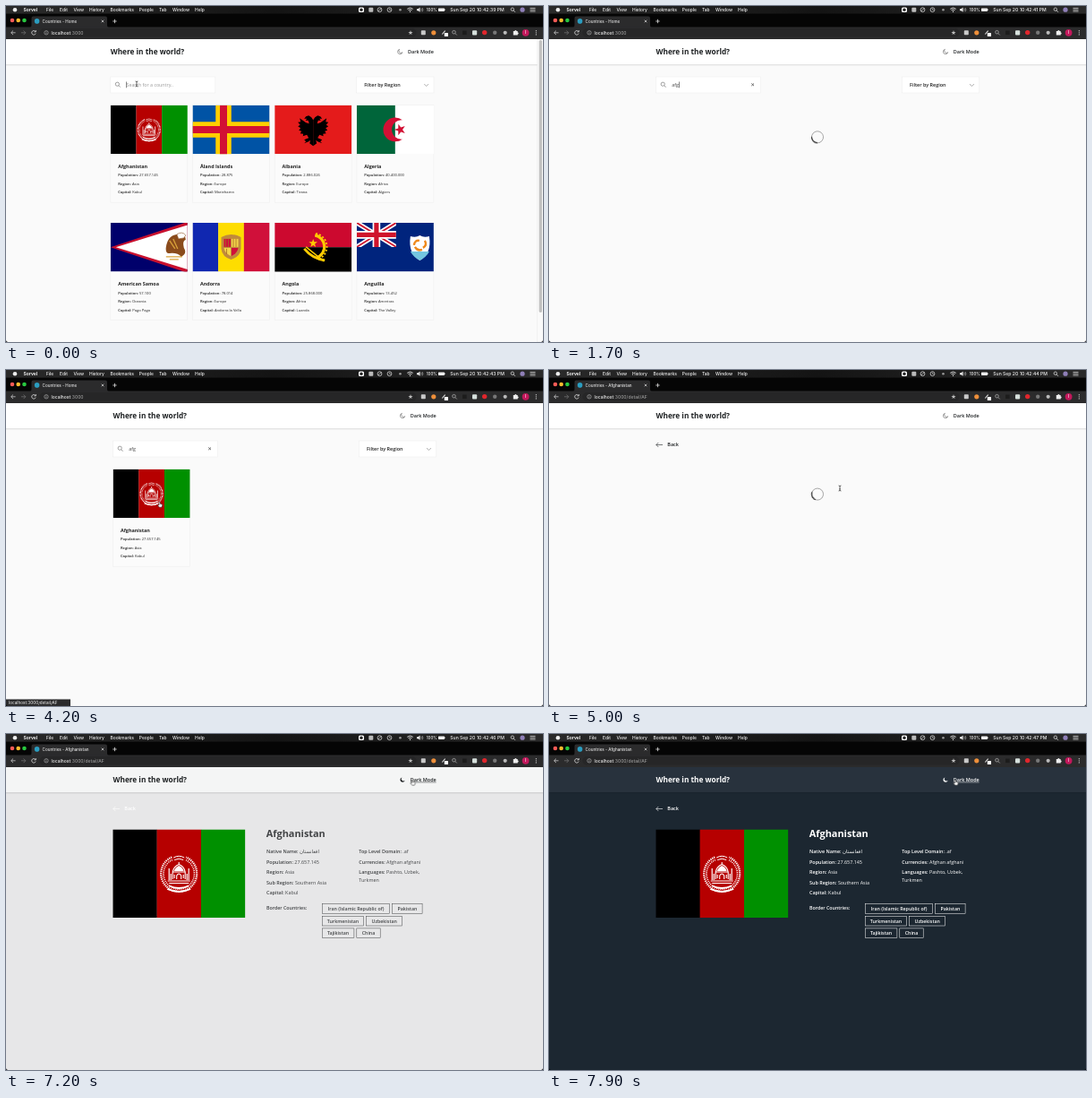
Recreate the animation shown at these times as an HTML page. Size 600x375 px, loop 8000 ms.

```html
<!DOCTYPE html>
<html lang="en">
<head>
<meta charset="utf-8">
<title>Countries</title>
<style>
html, body { margin: 0; width: 100%; height: 100%; overflow: hidden; background: #000; }
svg { display: block; }
text { font-family: "Open Sans", "Noto Sans", "DejaVu Sans", sans-serif; white-space: pre; }
.ui text { font-family: Inter, "Liberation Sans", sans-serif; font-weight: 500; }
.b { font-weight: 600; }
.h { font-weight: 700; }
.page { animation: page 8s infinite; }
.head { animation: head 8s infinite; }
.ink { animation: ink 8s infinite; fill: currentColor; }
.late { animation: late 8s infinite; fill: currentColor; }
.flip { animation: flip 8s infinite step-end; fill: currentColor; }
.spin { animation: spin 1s linear infinite; }
#cursor { animation: move 8s infinite; }
@keyframes page { 0%, 89.55% { fill: #fafafa; animation-timing-function: ease } 94.4%, 100% { fill: #1c2731 } }
@keyframes head { 0%, 89.7% { fill: #fff; animation-timing-function: ease } 94.4%, 100% { fill: #28323d } }
@keyframes ink { 0%, 89.44% { color: #2a2c2e; animation-timing-function: ease } 94.44%, 100% { color: #fff } }
@keyframes late { 0%, 91.85% { color: #1d2022; animation-timing-function: ease } 95.8%, 100% { color: #fff } }
@keyframes flip { 0% { color: #1d2022 } 89.44%, 100% { color: #fff } }
@keyframes spin { to { transform: rotate(360deg) } }
@keyframes move {
  0%, 47% { transform: translate(146px, 87px) }
  52%, 57% { transform: translate(172px, 150px) }
  62%, 68% { transform: translate(325px, 132px) }
  76% { transform: translate(338px, 165px) }
  87%, 100% { transform: translate(454.5px, 54px) }
}
</style>
</head>
<body>
<svg id="stage" width="100%" height="100%" viewBox="0 0 600 375"></svg>
<script>
const LOOP = 8000, W = 86, H = 54.5, RED = '#b60000', GREEN = '#009000';

const rect = (x, y, w, h, fill, more = '') =>
  `<rect x="${x}" y="${y}" width="${w}" height="${h}" ${fill ? `fill="${fill}"` : ''} ${more}/>`;
const dot = (x, y, r, fill, more = '') => `<circle cx="${x}" cy="${y}" r="${r}" fill="${fill}" ${more}/>`;
const path = (d, fill, more = '') => `<path d="${d}" fill="${fill}" ${more}/>`;
const line = (d, stroke, w = .7, more = '') => path(d, 'none', `stroke="${stroke}" stroke-width="${w}" ${more}`);
const text = (x, y, size, str, more = '') => `<text x="${x}" y="${y}" font-size="${size}" ${more}>${str}</text>`;
const at = (x, y, body, more = '') => `<g transform="translate(${x} ${y}) ${more}">${body}</g>`;
const on = (span, body) => `<g data-on="${span}">${body}</g>`;
const frame = (x, y, w, h, box, body) =>
  `<svg x="${x}" y="${y}" width="${w}" height="${h}" viewBox="${box}" preserveAspectRatio="none">${body}</svg>`;
const star = (r, fill, turn = -90) => {
  const pts = [...Array(10)].map((_, i) => {
    const a = (turn + i * 36) * Math.PI / 180, q = i % 2 ? r * .4 : r;
    return `${(q * Math.cos(a)).toFixed(2)},${(q * Math.sin(a)).toFixed(2)}`;
  });
  return `<polygon points="${pts.join(' ')}" fill="${fill}"/>`;
};
const bands = (...colors) => colors.map((c, i) => rect(i * W / 3, 0, W / 3 + .1, H, c)).join('');

// Flags, drawn on an 86 x 54.5 field
const seal =
  line('M-8,-18.5A20,20 0 1 0 8,-18.5', '#fff', 2.2, 'stroke-dasharray="1.3 .9"') +
  line('M-7.5,-15.5A17.2,17.2 0 1 0 7.5,-15.5', '#fff', 1.6, 'stroke-dasharray="1 1.1"') +
  line('M-6,-18Q0,-21.5 6,-18M-5,-15.5Q0,-18 5,-15.5', '#fff', 1) +
  line('M-7,6V-2Q-6,-8 0,-10.5Q6,-8 7,-2V6M0,-10.5V-13M-7,-2H7M-2.5,6V2Q0,-2 2.5,2V6M-5,1V5M5,1V5', '#fff', 1.1) +
  path('M-5.5,-3Q-4,-7.5 0,-9Q4,-7.5 5.5,-3Z', '#fff') +
  line('M-11,7V-6M11,7V-6M-9,7V0M9,7V0', '#fff', 1.2) + line('M-12.5,8H12.5M-11,10.5H11', '#fff', 1.2) +
  line('M-11,13.5Q0,18.5 11,13.5M-13,17Q0,23 13,17', '#fff', 1.8);
const wing = path('M0,-11L-2,-14 -5,-16 -8,-15 -10,-12.5 -7,-12.5 -8.5,-10.5 -5.5,-10.5 -4.5,-7 -8,-8 -15,-13 -14,-9 -17,-8.5 -14.5,-5.5 -17,-4 -14,-2 -16,.5 -13,1.5 -14.5,4 -11,4.5 -11.5,7 -7,5.5 -5,9 -10,11 -8,13 -10,15 -5,13 -3,11.5 -4,15 0,18Z', '#000');
const union = rect(0, 0, 44, 27, '#00247d') +
  line('M0,0L44,27M44,0L0,27', '#fff', 5.2) + line('M0,0L44,27M44,0L0,27', '#cf142b', 1.8) +
  line('M22,0V27M0,13.5H44', '#fff', 8.6) + line('M22,0V27M0,13.5H44', '#cf142b', 5.2);
const flags = [
  bands('#000', RED, GREEN) + at(43, 27.5, seal, 'scale(.62)'),
  rect(0, 0, W, H, '#0053a5') + line('M34.5,0V55M0,27.3H86', '#ffce00', 17.5) + line('M34.5,0V55M0,27.3H86', '#d21034', 8),
  rect(0, 0, W, H, '#e41b1b') + at(43, 27.5, wing + `<g transform="scale(-1 1)">${wing}</g>`),
  rect(0, 0, 43, H, '#00653a') + rect(43, 0, 43, H, '#fff') +
    path('M51,16.5A13.4,13.4 0 1 0 51,38A10.8,10.8 0 1 1 51,16.5Z', '#d21034') + at(48.5, 27.3, star(6.6, '#d21034', 180)),
  rect(0, 0, W, H, '#00006b') + path('M0,27.3L86,-1V56Z', '#c8102e') + path('M6,27.3L86,2.5V52Z', '#fff') +
    path('M62,27Q64,14 74,13Q84,12 84,19Q80,20 82,28Q86,34 79,38Q75,33 66,34Q61,35 62,27Z', '#8a4b1c') +
    path('M74,13Q80,9 84,14L82,17L76,18Z', '#fff', 'stroke="#8a4b1c" stroke-width=".6"') +
    line('M62,38H80M66,41H76M66,20L72,29M70,18L75,29', '#d9a23a', 1.3),
  bands('#1027b0', '#fedd00', '#d0103a') +
    path('M32,16Q43,10 54,16V29Q53,38 43,41Q33,38 32,29Z', '#c08a3c') + rect(35, 18, 7.5, 9, '#d0103a') +
    rect(43.5, 18, 7.5, 9, '#f3d34a') + path('M35,28H42.5V37Q36,34 35,28Z', '#f3d34a') +
    path('M43.5,28H51Q50,34 43.5,37Z', '#d0103a') + line('M37,18V27M40,18V27M45.5,18V27M48.5,18V27M38,29V35', '#a56b24', .8),
  rect(0, 0, W, 27.3, '#cc092f') + rect(0, 27.3, W, 28, '#000') +
    line('M45,14A13,13 0 0 1 47,39', '#ffcb00', 3.2) + line('M46,12A15,15 0 0 1 48,41', '#ffcb00', 1.8, 'stroke-dasharray="2 2"') +
    line('M33,29Q42,40 56,42', '#ffcb00', 2.8) + line('M55,43L35,27', '#ffcb00', 1.4) + at(43, 23, star(5, '#ffcb00')),
  rect(0, 0, W, H, '#00247d') + frame(0, 0, 44, 27, '0 0 44 27', union) +
    path('M60,15Q66,17 70.5,14Q75,17 81,15Q84,34 70.5,42Q57,34 60,15Z', '#fff') +
    path('M60,32H81Q78,38 70.5,42Q63,38 60,32Z', '#73c5e0') +
    line('M64,25Q65,19 70,20M76,20Q79,25 74,28M65,27Q68,32 73,30', '#ef8a1d', 2.4)
];
const countries = [
  ['Afghanistan', '27.657.145', 'Asia', 'Kabul'], ['Åland Islands', '28.875', 'Europe', 'Mariehamn'],
  ['Albania', '2.886.026', 'Europe', 'Tirana'], ['Algeria', '40.400.000', 'Africa', 'Algiers'],
  ['American Samoa', '57.100', 'Oceania', 'Pago Pago'], ['Andorra', '78.014', 'Europe', 'Andorra la Vella'],
  ['Angola', '25.868.000', 'Africa', 'Luanda'], ['Anguilla', '13.452', 'Americas', 'The Valley']
];
const fact = (x, y, size, label, value) => text(x, y, size, `<tspan class="b">${label}:</tspan> ${value}`);
const box = (x, y, w, h) => rect(x, y, w, h, '#fff', 'stroke="#eee" stroke-width=".6"');
const card = i => {
  const [name, pop, region, capital] = countries[i];
  return at(116.8 + i % 4 * 91.7, 110.7 + (i > 3 ? 131.2 : 0),
    rect(0, 0, W, 108.5, '#fbfbfb', 'stroke="#efefef" stroke-width=".6"') +
    frame(0, 0, W, H, `0 0 ${W} ${H}`, flags[i]) +
    text(8.4, 70, 5.45, name, 'class="h"') + fact(8.4, 79.8, 4.1, 'Population', pop) +
    fact(8.4, 89.2, 4.1, 'Region', region) + fact(8.4, 98.7, 4.1, 'Capital', capital));
};
const spinner = (y, turn) => at(300, y,
  dot(0, 0, 6.5, 'none', 'stroke="#8c8c8c" stroke-width=".7"') +
  `<g class="spin">${dot(0, 0, 6.5, 'none', 'stroke="#222" stroke-width="1.1" stroke-dasharray="10.2 40"')}</g>`, `rotate(${turn})`);
const lens = (x, y, r, c) => dot(x, y, r, 'none', `stroke="${c}" stroke-width=".7"`) + line(`M${x + r * .7},${y + r * .7}l2,2`, c);
const cross = (x, y, r, c) => line(`M${x - r},${y - r}l${2 * r},${2 * r}m0,${-2 * r}l${-2 * r},${2 * r}`, c);

const menu = [['File', 45], ['Edit', 60], ['View', 75.5], ['History', 93], ['Bookmarks', 116.5],
  ['People', 148.8], ['Tab', 171], ['Window', 186], ['Help', 211]];
const glass = '<linearGradient id="glass"><stop stop-color="#2a2a2a"/><stop offset=".5" stop-color="#141414"/><stop offset="1" stop-color="#2a2a2a"/></linearGradient>';
const menuBar = glass + rect(0, 0, 600, 8.6, 'url(#glass)') + dot(10, 4.2, 2.3, '#eee') +
  `<g fill="#f2f2f2">${text(19.5, 6, 5, 'Sorvel', 'style="font-weight:700"')}${menu.map(([s, x]) => text(x, 6, 4.9, s)).join('')}` +
  text(469.8, 5.8, 4.4, '100%') + text(496.3, 6, 5.1, 'Sun Sep 20') + text(526, 6, 5.1, '', 'id="clock"') + '</g>' +
  rect(394, 1.4, 6, 5.6, '#fff', 'rx="1.5"') + dot(397, 4.2, 1.7, '#222') + rect(405.3, 1.7, 5, 5, '#bbb', 'rx="1"') +
  dot(417.5, 4.2, 2.4, 'none', 'stroke="#eee" stroke-width=".7"') + line('M415.8,5.9l3.4,-3.4', '#eee') +
  dot(428.5, 4.2, 2.4, 'none', 'stroke="#eee" stroke-width=".7"') + line('M428.5,2.7V4.4H430', '#eee', .5) + dot(440.5, 4.2, 1.3, '#999') +
  line('M448.3,3.3Q451.5,.7 454.7,3.3M449.6,4.8Q451.5,3.2 453.4,4.8', '#eee', .9) + dot(451.5, 6.2, .7, '#eee') +
  path('M459,3.2H460.5L462.5,1.6V6.8L460.5,5.2H459Z', '#eee') + line('M463.6,2.8Q464.8,4.2 463.6,5.6M465,2Q466.8,4.2 465,6.4', '#eee', .5) +
  rect(483, 2.4, 7, 3.6, '#eee', 'rx=".7"') + rect(490.4, 3.5, .6, 1.4, '#eee') + lens(565.8, 3.7, 1.7, '#eee') +
  dot(577, 4.2, 2.6, '#8f7fb8') + line('M585.5,2.4h6M585.5,4.2h6M585.5,6h6', '#eee', .7);
const tools = rect(0, 8.5, 600, 16, '#050505') + path('M26.5,24Q28.5,24 28.5,21V13.5Q28.5,11.5 30.5,11.5H111Q113,11.5 113,13.5V21Q113,24 115,24Z', '#2b2b2c') +
  rect(0, 23.5, 600, 13.5, '#2b2b2c') + rect(37.5, 25, 421, 9.6, '#262627', 'rx="4.8"') +
  dot(7, 16, 2.3, '#fc5b57') + dot(13.7, 16, 2.3, '#fdbc2e') + dot(20.5, 16, 2.3, '#28c840') + dot(34.6, 16.9, 2.8, '#2b9dc0') +
  '<g fill="#e4e4e4">' + on('0-4450', text(40.6, 18.7, 4.55, 'Countries - Home')) + on('4450-8000', text(40.6, 18.7, 4.55, 'Countries - Afghanistan')) + '</g>' +
  cross(108, 17, 1.3, '#ddd') + line('M119.3,17h4.4M121.5,14.8v4.4', '#ddd', .8) +
  line('M10.6,29.8H5.8M8,27.5L5.7,29.8L8,32.1', '#ddd') + line('M17,29.8H21.8M19.6,27.5L21.9,29.8L19.6,32.1', '#777') +
  line('M33,28.6A2.3,2.3 0 1 0 33.2,30.6M33.3,27V28.9H31.4', '#ddd', .8) +
  dot(45, 29.8, 2.2, 'none', 'stroke="#bbb" stroke-width=".6"') + line('M45,29.3V31M45,28.3V28.8', '#bbb', .6) +
  text(50.5, 31.7, 5, 'localhost<tspan fill="#999">:3000<tspan id="route"></tspan></tspan>', 'fill="#eee"') +
  at(452, 29.8, star(2.7, '#bbb')) + rect(463.8, 27.3, 5, 5, '#c9c9c9', 'rx=".8"') + dot(477.8, 29.8, 2.6, '#ee8f3a') +
  line('M487.3,31.5l3.4,-3.8', '#ddd', 1.1) + rect(489.8, 30, 4.2, 4, '#fff', 'rx=".6"') + lens(500.5, 29.2, 1.8, '#bbb') +
  rect(510, 27.5, 4.6, 4.6, '#1c1c1c') + rect(521, 27.2, 5.2, 5.2, '#d6e0dc', 'rx="1"') + dot(534.7, 29.6, 2.7, '#e0262c') +
  dot(546.2, 29.8, 2.2, '#777') + dot(557.7, 29.8, 2.1, '#bbb') + path('M566.8,28h1.6a1,1 0 0 1 2,0h1.3v1.6a1,1 0 0 1 0,2v1h-4.9z', '#eee') +
  dot(580.6, 29.8, 3.9, '#c2185b') + text(580.6, 31.4, 4.4, 'I', 'fill="#fff" text-anchor="middle"') +
  [27.7, 29.8, 31.9].map(y => dot(592.3, y, .6, '#ddd')).join('');

const moon = 'M2.6,.7A2.7,2.7 0 1 1-.7,-2.6A2.2,2.2 0 0 0 2.6,.7Z';
const header = rect(0, 65, 600, 1.1, '#000', 'opacity=".09"') + rect(0, 66.1, 600, 1, '#000', 'opacity=".03"') +
  rect(0, 36.5, 600, 28.5, '', 'class="head"') +
  `<g class="shift"><g class="late">${text(116.7, 53.8, 8.25, 'Where in the world?', 'class="h"')}${text(449, 53, 5.45, 'Dark Mode', 'class="b"')}` +
  on('6850-8000', rect(449, 53.7, 28.8, .5)) + on('7155-8000', at(440.3, 51, path(moon, 'currentColor'))) + '</g>' +
  on('0-7155', at(440.3, 51, line(moon, '#444', .5))) + '</g>';

const home = on('0-4450', '<g class="shift" fill="#222">' +
  box(116.8, 79, 117, 18) + lens(124.4, 87.2, 2.1, '#777') + text(134.5, 90, 5.3, '', 'id="query"') +
  rect(0, 84.5, .5, 6.8, '#111', 'id="caret"') + on('950-4450', cross(224.8, 87.8, 1.4, '#333')) +
  box(391.6, 79, 86.4, 18) + text(400.2, 90, 5.45, 'Filter by Region', 'class="b"') + line('M467.3,87.1l2.4,2.4l2.4,-2.4', '#777', .6) +
  on('0-1050', countries.map((_, i) => card(i)).join('')) + on('3450-4450', card(0)) + '</g>' +
  on('0-1050', rect(593.8, 37, 6.2, 338, '#fafafa', 'stroke="#e6e6e6" stroke-width=".4"') + rect(595.6, 38, 3.3, 304, '#c1c1c1', 'rx="1.6"')) +
  on('1050-3450', spinner(146.3, -162)));

const borders = [['Iran (Islamic Republic of)', 353.3, 189.7, 75.4], ['Pakistan', 431.7, 189.7, 33.4], ['Turkmenistan', 353.3, 203.3, 46.4],
  ['Uzbekistan', 402.7, 203.3, 40], ['Tajikistan', 353.3, 216.9, 35.6], ['China', 391.8, 216.9, 26.4]];
const facts = [[291, 133.3, 'Native Name', 'افغانستان'], [291, 144.8, 'Population', '27.657.145'], [291, 156.2, 'Region', 'Asia'],
  [291, 167.6, 'Sub Region', 'Southern Asia'], [291, 179, 'Capital', 'Kabul'], [394.3, 133.3, 'Top Level Domain', '.af'],
  [394.3, 144.8, 'Currencies', 'Afghan afghani'], [394.3, 156.2, 'Languages', 'Pashto, Uzbek,']];
const detail = on('4450-8000', `<g class="flip">${text(132.3, 85.4, 5.45, 'Back', 'class="b"')}${line('M127,83.5H119.8M122.3,81L119.8,83.5L122.3,86', 'currentColor', .6)}</g>`) +
  on('4450-5250', spinner(138.6, 110)) +
  on('5250-8000', frame(119.3, 106.4, 148, 98.6, `0 0 ${W} ${H}`, bands('#000', RED, GREEN)) +
    at(193.2, 156, seal) + '<g class="ink">' + text(290.8, 115, 10.9, 'Afghanistan', 'class="h"') +
    facts.map(([x, y, label, value]) => fact(x, y, 5.42, label, value)).join('') + text(394.3, 164.6, 5.42, 'Turkmen') +
    text(291, 195.7, 5.3, 'Border Countries:', 'class="b"') +
    borders.map(([s, x, y, w]) => rect(x, y, w, 10.7, 'none', 'stroke="currentColor" stroke-width=".5"') +
      text(x + w / 2, y + 7.3, 5.3, s, 'class="b" text-anchor="middle"')).join('') + '</g>');

const status = on('4050-4650', '<g class="ui">' + rect(0, 367.5, 72, 7.5, '#2b2b2c') + text(3, 373, 4.6, 'localhost:3000/detail/AF', 'fill="#ddd"') + '</g>');
const beam = 'M-1.4,-3Q0,-3 0,-2V2Q0,3 -1.4,3M1.4,-3Q0,-3 0,-2M0,2Q0,3 1.4,3M-.7,.9H.7';
const hand = path('M-1,-2.6Q-.2,-3.3 .2,-2.4L.5,-.4Q2.6,-.5 2.7,.6Q2.7,2 1.9,3.2H-.7L-2.5,.9Q-2.2,0 -.9,.7Z', '#fff', 'stroke="#111" stroke-width=".5"');
const cursor = '<g id="cursor">' + on('0-950,3750-4000,4650-6850', line(beam, '#fff', 1.4) + line(beam, '#222', .7)) + on('4000-4650,6850-8000', hand) + '</g>';

const stage = document.getElementById('stage');
stage.innerHTML = rect(0, 36.5, 600, 338.5, '', 'class="page"') + header + home + detail + status +
  `<g class="ui">${tools}${menuBar}</g>` + path('M0,372.5Q0,375 2.5,375H0ZM600,372.5Q600,375 597.5,375H600Z', '#000') + cursor;

const $ = id => document.getElementById(id);
const timed = [...document.querySelectorAll('[data-on]')].map(el => [el, el.dataset.on.split(',').map(s => s.split('-').map(Number))]);
const shifted = document.querySelectorAll('.shift');
const keys = [950, 1200, 1450];
const setText = (el, s) => { if (el.textContent !== s) el.textContent = s; };

function render(t) {
  for (const [el, spans] of timed) el.style.display = spans.some(([a, b]) => t >= a && t < b) ? '' : 'none';
  for (const el of shifted) el.setAttribute('transform', `translate(${t < 1050 ? 0 : 2.8} 0)`);
  setText($('clock'), `10:42:${39 + Math.floor((t + 500) / 1000)} PM`);
  setText($('route'), t < 4450 ? '' : '/detail/AF');

  const typed = keys.filter(k => t >= k).length, query = $('query');
  setText(query, typed ? 'afg'.slice(0, typed) : 'Search for a country..');
  query.setAttribute('fill', typed ? '#444' : '#999');
  const since = typed ? t - keys[typed - 1] : t;
  $('caret').setAttribute('x', 134.2 + (typed && t < 4450 ? query.getComputedTextLength() + .5 : 0));
  $('caret').style.display = since % 1000 < 500 ? '' : 'none';
}

const start = performance.now();
function tick() {
  render((performance.now() - start) % LOOP);
  requestAnimationFrame(tick);
}
tick();
</script>
</body>
</html>
```
